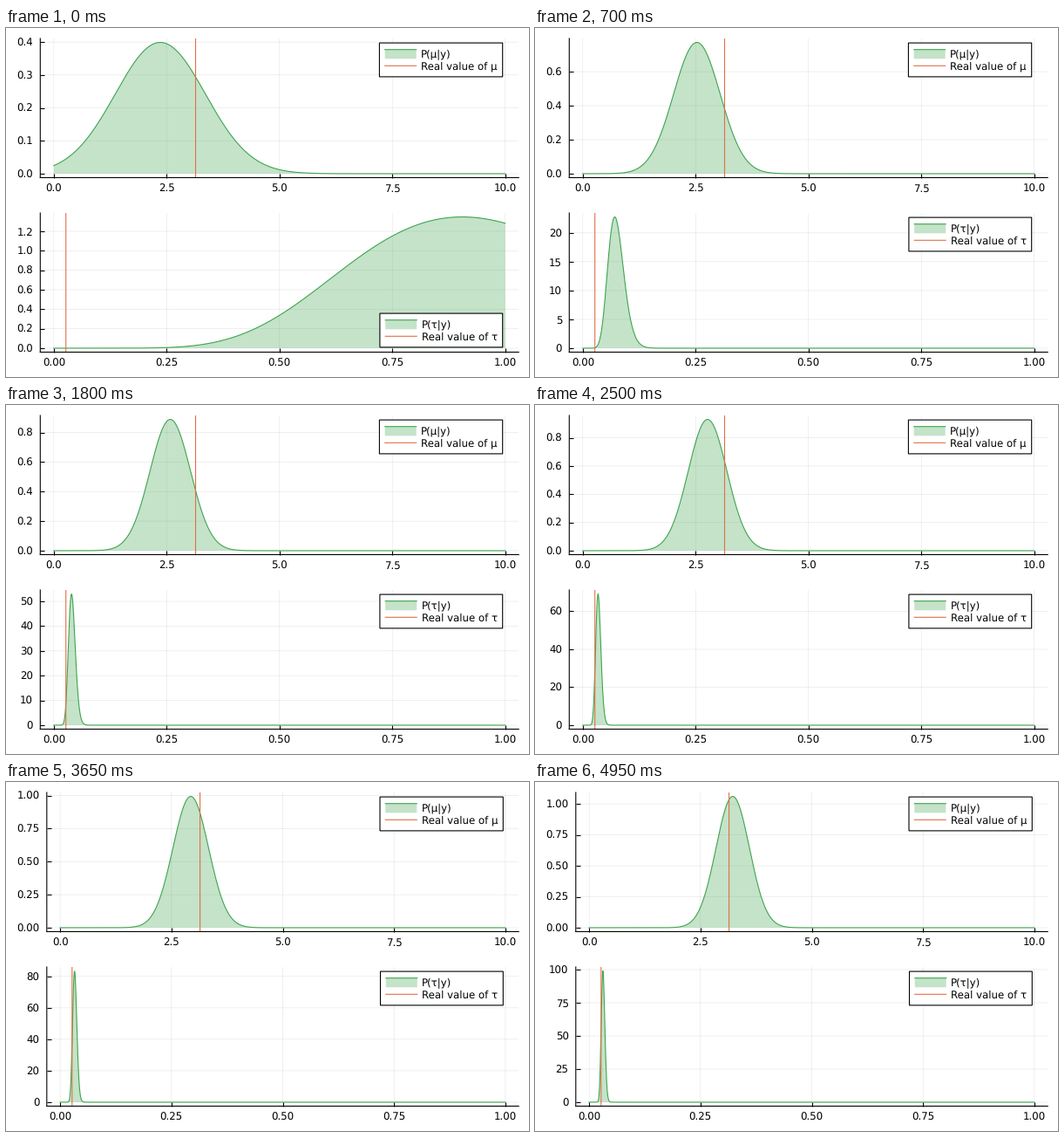
Recreate the animation shown at these times as a matplotlib script. Size 600 by 400 pixels, loop 5 s.

```python
import math

import matplotlib.pyplot as plt
import numpy as np
from matplotlib.animation import FuncAnimation
from matplotlib.patches import Rectangle
from matplotlib.transforms import Affine2D

W, H, DPI = 600, 400, 100
FRAMES, INTERVAL = 100, 50
PX = 72 / DPI  # one pixel in points
FONT = 11.75 * PX
LINE = 1.1 * PX
GREEN, ORANGE = "#3DA44D", "#E26F46"
RIGHT, LEFT, LEFT_WIDE = 588.2, 39.3, 46.8
LEGEND_RIGHT = 569.7
PAD = 0.03

# Posterior parameters after a number of observations: (step, value)
MU_MEAN = [(0, 2.36), (7, 3.06), (11, 2.52), (23, 2.55), (36, 2.58), (44, 2.77),
           (55, 2.76), (64, 2.86), (83, 3.015), (88, 3.1), (95, 3.25), (99, 3.225)]
MU_PRECISION = [(0, 1), (1, 1.54), (2, 1.93), (4, 2.5), (7, 3.12), (11, 3.57),
                (23, 4.28), (36, 4.96), (64, 5.906), (83, 6.54), (99, 7.07)]
TAU_RATE = [(0, 10.5), (7, 79.8), (11, 165), (23, 437), (36, 699),
            (64, 1343), (83, 1509), (99, 1909)]

# Lines keep their fractional positions instead of snapping to whole pixels.
plt.rcParams.update({"font.family": "DejaVu Sans", "font.size": FONT,
                     "path.snap": False, "text.hinting": "none"})


def along(knots, n):
    steps, values = zip(*knots)
    return float(np.interp(n, steps, values))


def mu_density(x, n):
    mean, precision = along(MU_MEAN, n), along(MU_PRECISION, n)
    peak = math.sqrt(precision / (2 * math.pi))
    return peak * np.exp(-precision * (x - mean) ** 2 / 2), peak


def tau_density(x, n):
    """Gamma density whose shape grows by one half per observation."""
    k, rate = 9.5 + n / 2, along(TAU_RATE, n)
    peak = rate * math.exp(k * math.log(k) - k - math.lgamma(k + 1))
    u = np.maximum(x, 1e-9) * rate / k
    return peak * np.exp(k * (np.log(u) - u + 1)), peak


def nice_ticks(peak):
    """Ticks from zero, weighing tick count, coverage and round steps."""
    top, span = peak * (1 + PAD), peak * (1 + 2 * PAD)
    best = None
    for z in range(-2, 3):
        for q, quality in ((1, 1), (5, 0.9), (2, 0.7), (2.5, 0.5), (3, 0.2)):
            step = q * 10.0 ** z
            count = int(top / step + 1e-9) + 1
            if not 4 <= count <= 8:
                continue
            score = (0.25 * (1 - abs(count - 5) / 5)
                     + 0.5 * span / ((count - 1) * step) + 0.25 * quality)
            key = (round(score, 9), -count, step)
            if best is None or key > best:
                best = key
    _, minus_count, step = best
    digits = next((d for d in (0, 1) if abs(step * 10 ** d - round(step * 10 ** d)) < 1e-9), 2)
    values = [i * step for i in range(-minus_count)]
    return values, [f"{v:.{digits}f}" for v in values]


class Panel:
    def __init__(self, top, symbol, xmax, xdigits, truth, density, legend_left):
        self.top, self.density = top, density
        self.x = np.linspace(0, xmax, 1001)
        self.ax = ax = fig.add_axes([0, 0, 1, 1], facecolor="none")
        ax.set_xlim(-PAD * xmax, (1 + PAD) * xmax)
        ax.set_axisbelow(True)
        ax.grid(color="black", alpha=0.1, lw=0.6 * PX)
        ax.spines[["top", "right"]].set_visible(False)
        ax.spines[["left", "bottom"]].set_linewidth(LINE)
        ax.tick_params(direction="in", length=5 * PX, width=LINE, labelsize=FONT)
        ax.tick_params(axis="x", pad=16.4 * PX)
        ax.tick_params(axis="y", pad=8.2 * PX)
        xticks = np.linspace(0, xmax, 5)
        ax.set_xticks(xticks, [f"{v:.{xdigits}f}" for v in xticks], va="baseline")

        self.fill, = ax.fill([0, 1, 1], [0, 0, 1], color=GREEN, alpha=0.3, lw=0)
        self.curve, = ax.plot([], [], color=GREEN, lw=LINE)
        ax.axvline(truth, color=ORANGE, lw=LINE, zorder=2.2)
        self.add_legend(symbol, legend_left)

    def add_legend(self, symbol, left):
        self.shift = Affine2D()
        place = self.shift + stage.transData
        x0, x1, y = left + 6.3, left + 42.3, self.top + 12.7

        def box(x, y, w, h, **style):
            stage.add_patch(Rectangle((x, y), w, h, transform=place, **style))

        def line(y, color):
            stage.plot([x0, x1], [y, y], color=color, lw=LINE, transform=place)

        box(left, self.top + 5.1, LEGEND_RIGHT - left, 38.8, fc="white", ec="black", lw=LINE)
        box(x0, y, x1 - x0, 10.6, fc=GREEN, alpha=0.3, lw=0, zorder=1.5)
        line(y, GREEN)
        line(self.top + 31.3, ORANGE)
        for text, base in ((f"P({symbol}|y)", 22.3), (f"Real value of {symbol}", 35.4)):
            stage.text(left + 47.8, self.top + base, text, transform=place,
                       va="baseline", size=FONT)

    def update(self, n):
        """Draw the density and return the longest tick label's length."""
        y, peak = self.density(self.x, n)
        self.curve.set_data(self.x, y)
        outline = np.column_stack([self.x, y])
        self.fill.set_xy(np.vstack([[self.x[0], 0], outline, [self.x[-1], 0]]))
        self.ax.set_ylim(-PAD * peak, (1 + PAD) * peak)
        values, labels = nice_ticks(peak)
        self.ax.set_yticks(values, labels)
        self.crowded = y[-1] > 0.7 * peak
        return max(map(len, labels))

    def place(self, wide):
        left = LEFT_WIDE if wide else LEFT
        height = 159.5
        self.ax.set_position([left / W, 1 - (self.top + height) / H,
                              (RIGHT - left) / W, height / H])
        self.shift.clear().translate(0.6 if wide else 0, 110 if self.crowded else 0)


fig = plt.figure(figsize=(W / DPI, H / DPI), dpi=DPI, facecolor="white")
stage = fig.add_axes([0, 0, 1, 1], zorder=5)
stage.set(xlim=(0, W), ylim=(H, 0))
stage.set_autoscale_on(False)
stage.axis("off")

panels = [
    Panel(12, "μ", 10, 1, math.pi, mu_density, 428.4),
    Panel(212, "τ", 1, 2, 0.0268, tau_density, 428.9),
]


def draw(n):
    wide = max([panel.update(n) for panel in panels]) >= 4
    for panel in panels:
        panel.place(wide)
    return []


anim = FuncAnimation(fig, draw, frames=FRAMES, interval=INTERVAL,
                     init_func=lambda: draw(0), repeat=True, repeat_delay=0)
plt.show()
```
